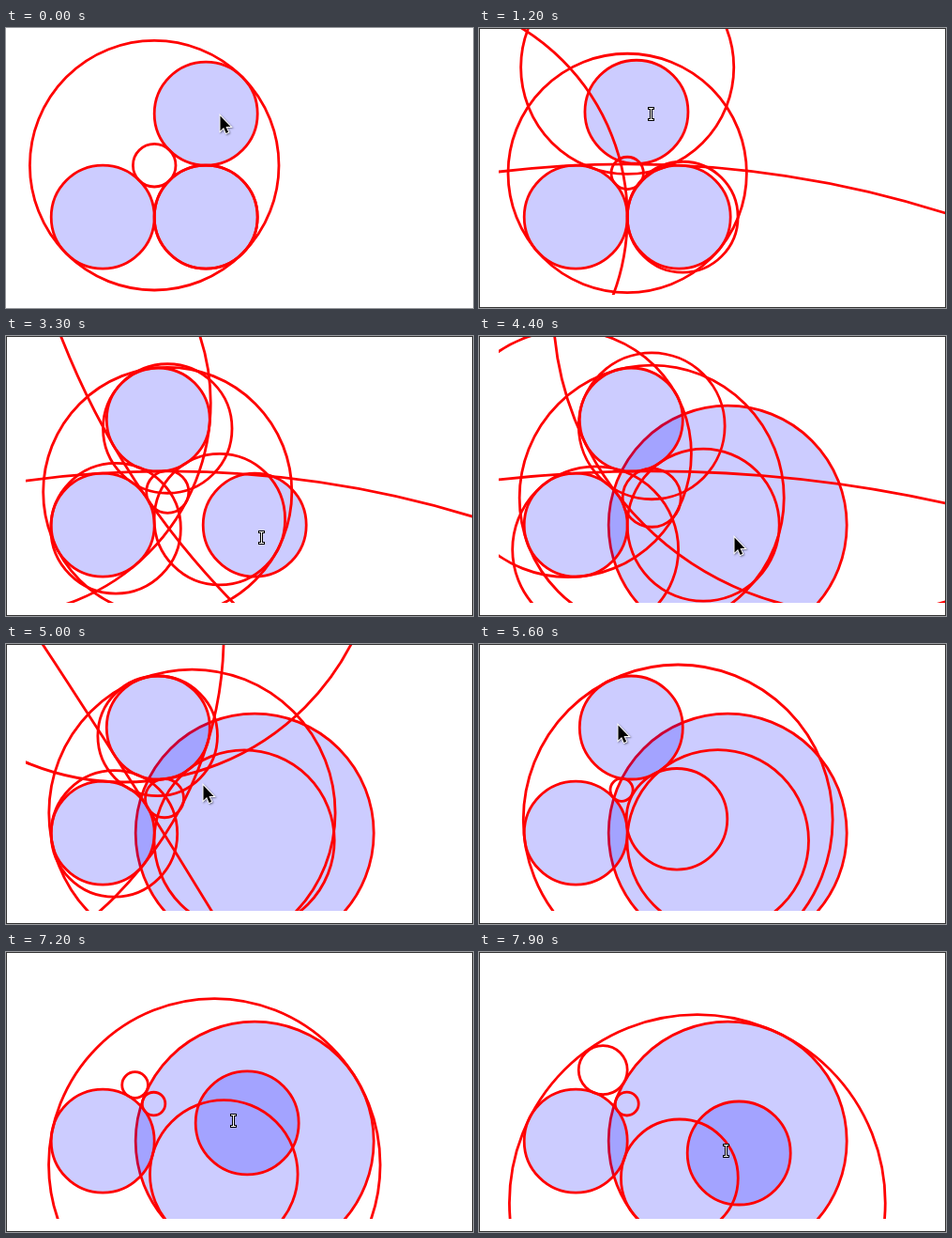
An HTML page with a canvas that plays this animation: 498x298 px, repeating every 8 s.

```html
<!DOCTYPE html>
<html>
<head>
<meta charset="utf-8">
<title>Circles tangent to three circles</title>
<style>
html, body { margin: 0; width: 100%; height: 100%; overflow: hidden; background: #fff; }
canvas { display: block; }
</style>
</head>
<body>
<canvas id="stage" width="498" height="298"></canvas>
<script>
const ctx = document.getElementById('stage').getContext('2d');
const LOOP = 8000, STEP = 100, TAU = 2 * Math.PI;

const ramp = (t, from, to) => Math.min(1, Math.max(0, (t - from) / (to - from)));
const mix = (a, b, p) => a + (b - a) * p;
const between = (a, b, p) => ({ x: mix(a.x, b.x, p), y: mix(a.y, b.y, p) });

const cornerC = { x: 213, y: 91 }, topC = { x: 162.1, y: 88.8 };
const bendC = [topC, { x: 197, y: 91.5 }, { x: 241, y: 154 }, { x: 277, y: 213.8 }];

// Point on a Bezier curve, by repeated mixing of neighbours.
function bezier(points, p) {
  while (points.length > 1) points = points.slice(1).map((q, i) => between(points[i], q, p));
  return points[0];
}

// The three discs, given the progress of each of the four actions.
function discs(moveC, moveB, growB, bend) {
  const c = bend > 0 ? bezier(bendC, bend) : between(cornerC, topC, moveC);
  return [
    { x: 213 + 52 * moveB, y: 201, r: 55 + 72 * growB },
    { x: 103, y: 201, r: 55 },
    { ...c, r: 55 }
  ];
}

const shownDiscs = t => discs(ramp(t, 400, 1300), ramp(t, 2300, 2950),
  ramp(t, 3500, 4300), ramp(t, 5650, 7900) ** .53);

// The tangent circles follow the discs with a growing delay.
const lateDiscs = t => discs(ramp(t, 400, 2250), ramp(t, 2300, 4150),
  ramp(t, 4400, 5970), .448 * ramp(t, 6050, 7900) ** .75);

// Problem of Apollonius: up to two circles for each choice of signs.
function tangents([b, a, c]) {
  const found = [];
  const ux = b.x - a.x, uy = b.y - a.y, vx = c.x - a.x, vy = c.y - a.y;
  const det = ux * vy - uy * vx;
  for (const sb of [1, -1]) for (const sc of [1, -1]) {
    const k = sb * b.r - a.r, l = sc * c.r - a.r;
    const m = (ux * ux + uy * uy - k * k) / 2, n = (vx * vx + vy * vy - l * l) / 2;
    const x0 = (m * vy - n * uy) / det, x1 = (l * uy - k * vy) / det;
    const y0 = (n * ux - m * vx) / det, y1 = (k * vx - l * ux) / det;
    const qa = x1 * x1 + y1 * y1 - 1, qb = x0 * x1 + y0 * y1, qc = x0 * x0 + y0 * y0;
    const add = p => found.push({ x: a.x + x0 + x1 * p, y: a.y + y0 + y1 * p, r: Math.abs(p - a.r) });
    const disc = qb * qb - qa * qc;
    if (Math.abs(qa) < 1e-9) {
      if (Math.abs(qb) > 1e-6) add(-qc / (2 * qb));
    } else if (Math.abs(disc) < 1e-6 * qb * qb) {
      add(-qb / qa);
    } else if (disc > 0) {
      add((-qb + Math.sqrt(disc)) / qa);
      add((-qb - Math.sqrt(disc)) / qa);
    }
  }
  return found.filter(o => o.r < 1e5);
}

function ring(o, fill) {
  ctx.beginPath();
  ctx.arc(o.x, o.y, o.r, 0, TAU);
  if (fill) ctx.fill();
  ctx.stroke();
}

function strokePath(path, color, width) {
  ctx.strokeStyle = color;
  ctx.lineWidth = width;
  ctx.stroke(path);
}

const arrow = new Path2D('M0 0V16L3.6 12.6L6.2 18.4L8.6 17.3L6 11.6H11Z');
const beam = new Path2D('M-2 -6H2M0 -6V6M-2 6H2');

function pointerAt(t, c) {
  if (t < 1500) return { x: c.x + 15, y: c.y + 1.5 };
  if (t >= 5600) return { x: c.x - 14.5, y: c.y - 3 };
  const onB = { x: 228, y: 213 }, dropB = { x: 272, y: 214 };
  if (t < 2300) return between({ x: 177, y: 90 }, onB, ramp(t, 1500, 2200));
  if (t < 4500) return between(onB, dropB, ramp(t, 2300, 2950));
  return between(dropB, { x: 147, y: 85 }, ramp(t, 4500, 5500));
}

const pressed = t => t >= 400 && t < 1500 || t >= 2250 && t < 3400 || t >= 5650;

function drawPointer(t, c) {
  const { x, y } = pointerAt(t, c);
  ctx.save();
  ctx.translate(Math.round(x) + .5, Math.round(y) + .5);
  if (pressed(t)) {
    ctx.lineCap = 'square';
    strokePath(beam, '#000', 3);
    strokePath(beam, '#fff', 1);
  } else {
    ctx.shadowColor = 'rgba(0,0,0,.45)';
    ctx.shadowBlur = 2;
    ctx.shadowOffsetX = ctx.shadowOffsetY = 1;
    strokePath(arrow, '#fff', 2);
    ctx.shadowColor = 'transparent';
    ctx.fillStyle = '#000';
    ctx.fill(arrow);
  }
  ctx.restore();
}

function draw(t) {
  const shown = shownDiscs(t);
  ctx.fillStyle = '#fff';
  ctx.fillRect(0, 0, 498, 298);
  ctx.save();
  ctx.beginPath();
  ctx.rect(21, 1, 476, 283);
  ctx.clip();
  ctx.translate(.2, .2);
  ctx.fillStyle = 'rgba(0,0,255,.2)';
  ctx.strokeStyle = '#f00';
  ctx.lineWidth = 2.8;
  shown.forEach(o => ring(o, true));
  tangents(lateDiscs(t)).forEach(o => ring(o));
  ctx.restore();
  if (t >= 400) {
    ctx.strokeStyle = '#333';
    ctx.lineWidth = 1;
    ctx.strokeRect(.5, .5, 497, 297);
  }
  drawPointer(t, shown[2]);
}

const start = performance.now();
function frame() {
  const t = (performance.now() - start) % LOOP;
  draw(Math.floor(t / STEP) * STEP);
  requestAnimationFrame(frame);
}
frame();
</script>
</body>
</html>
```
